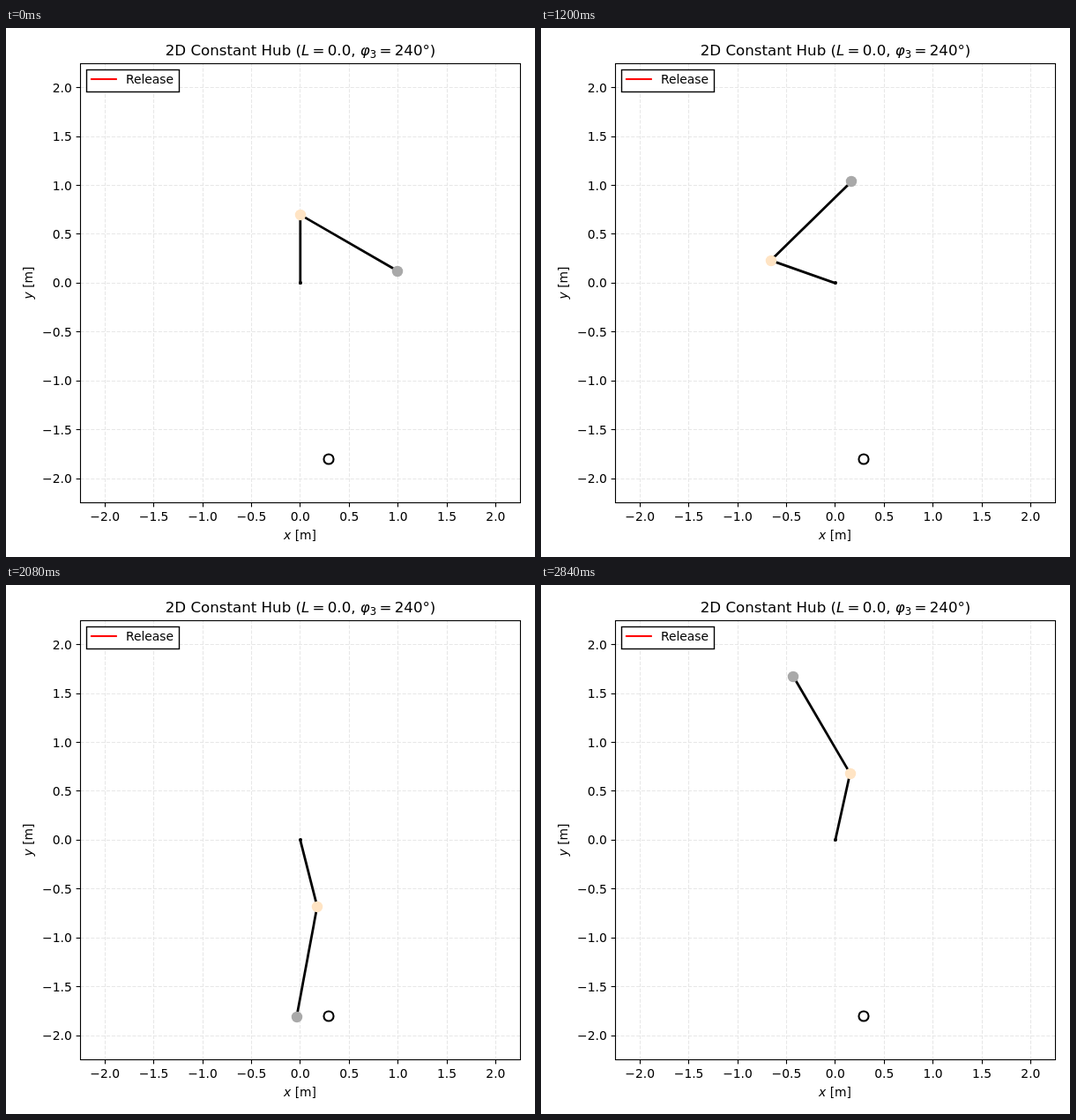
An HTML page with a canvas that plays this animation: 600 by 600 pixels, repeating every 2860 ms.

```html
<!DOCTYPE html>
<html lang="en">
<head>
<meta charset="utf-8">
<title>2D Constant Hub</title>
<style>
html, body { margin: 0; width: 100%; height: 100%; overflow: hidden; background: #fff; }
canvas { display: block; width: 600px; height: 600px; }
</style>
</head>
<body>
<canvas id="stage" width="600" height="600"></canvas>
<script>
const ctx = document.getElementById('stage').getContext('2d');
const LOOP = 2860, STEP = 20;
const X0 = 333.8, Y0 = 289.4, UNIT = 110.8;
const BOX = { l: 84.5, t: 40.5, r: 583.5, b: 538.5 };
const PT = 100 / 72;
const FAMILY = '"DejaVu Sans", sans-serif';
const ARM = 0.7, CLUB = 1.15;
const RATE = 49.25; // degrees per second squared under constant torque

// After release: [seconds, arm lag in degrees, wrist opening in degrees]
const RELEASE = [
  [0.88, 0, 0], [1.08, 0.1, 1], [1.3, 0.8, 7.8], [1.5, 2.4, 21.2],
  [1.62, 4.25, 31.4], [2.08, 18.8, 95.2], [2.16, 22.3, 107.7],
  [2.44, 37.1, 150.2], [2.7, 47.4, 169], [2.84, 49.7, 162.8]
];

const px = x => X0 + x * UNIT;
const py = y => Y0 - y * UNIT;
const snap = v => Math.floor(v) + 0.5;

function chord(i, k) {
  const a = RELEASE[i], b = RELEASE[i + 1];
  return (b[k] - a[k]) / (b[0] - a[0]);
}

function slope(i, k) {
  const last = RELEASE.length - 1;
  if (i === 0) return 0;
  if (i === last) return 2 * chord(last - 1, k) - slope(last - 1, k);
  const h0 = RELEASE[i][0] - RELEASE[i - 1][0];
  const h1 = RELEASE[i + 1][0] - RELEASE[i][0];
  return (chord(i - 1, k) * h1 + chord(i, k) * h0) / (h0 + h1);
}

function curve(t, k) {
  if (t <= RELEASE[0][0]) return 0;
  let i = 0;
  while (i < RELEASE.length - 2 && t > RELEASE[i + 1][0]) i++;
  const a = RELEASE[i], b = RELEASE[i + 1], h = b[0] - a[0];
  const u = (t - a[0]) / h, v = 1 - u;
  return v * v * (1 + 2 * u) * a[k] + u * u * (1 + 2 * v) * b[k]
    + h * u * v * (v * slope(i, k) - u * slope(i + 1, k));
}

function line(x1, y1, x2, y2, color, width, cap = 'butt') {
  ctx.strokeStyle = color;
  ctx.lineWidth = width;
  ctx.lineCap = cap;
  ctx.beginPath();
  ctx.moveTo(x1, y1);
  ctx.lineTo(x2, y2);
  ctx.stroke();
}

function disc(x, y, r, color) {
  ctx.fillStyle = color;
  ctx.beginPath();
  ctx.arc(Math.round(x), Math.round(y), r, 0, 2 * Math.PI);
  ctx.fill();
}

function text(str, x, y, align = 'left', size = 10 * PT, style = '') {
  ctx.font = `${style} ${size}px ${FAMILY}`;
  ctx.textAlign = align;
  ctx.fillStyle = '#000';
  ctx.fillText(str, x, y);
  return ctx.measureText(str).width;
}

// Runs are [string, style, gap around, scale, drop], centred on cx
function mixed(runs, cx, y, size) {
  const width = ([s, style, gap = 0, scale = 1]) => {
    ctx.font = `${style} ${size * scale}px ${FAMILY}`;
    return ctx.measureText(s).width + 2 * gap;
  };
  let x = cx - runs.reduce((sum, run) => sum + width(run), 0) / 2;
  for (const run of runs) {
    const [s, style, gap = 0, scale = 1, drop = 0] = run;
    text(s, x + gap, y + drop, 'left', size * scale, style);
    x += width(run);
  }
}

function drawAxes() {
  const thin = 0.8 * PT, tick = 3.5 * PT;
  const marks = Array.from({ length: 9 }, (_, i) => i / 2 - 2);
  const label = v => v.toFixed(1).replace('-', '\u2212');

  ctx.setLineDash([2.96 * PT, 1.28 * PT]);
  for (const v of marks) {
    const x = snap(px(v)), y = snap(py(v));
    line(x, BOX.b, x, BOX.t, '#e7e7e7', thin);
    line(BOX.l, y, BOX.r, y, '#e7e7e7', thin);
  }
  ctx.setLineDash([]);

  for (const v of marks) {
    const x = snap(px(v)), y = snap(py(v));
    line(x, BOX.b, x, BOX.b + tick, '#000', thin);
    line(BOX.l, y, BOX.l - tick, y, '#000', thin);
    text(label(v), px(v), 559, 'center');
    text(label(v), 74.8, Math.round(py(v) + 5), 'right');
  }

  const unit = name => [[name, 'italic'], [' [m]', '']];
  mixed(unit('x'), 333.5, 580, 10 * PT);
  ctx.save();
  ctx.translate(29.5, 289);
  ctx.rotate(-Math.PI / 2);
  mixed(unit('y'), 0, 0, 10 * PT);
  ctx.restore();

  const equals = ['=', '', 3.25];
  mixed([
    ['2D Constant Hub (', ''], ['L', 'italic'], equals, ['0.0, ', ''],
    ['\u03c6', 'italic'], ['3', '', 0, 0.7, 2.7], equals, ['240\u00b0)', '']
  ], 334, 31, 12 * PT);
}

function drawFrame() {
  ctx.strokeStyle = '#000';
  ctx.lineWidth = 0.8 * PT;
  ctx.strokeRect(BOX.l, BOX.t, BOX.r - BOX.l, BOX.b - BOX.t);

  ctx.fillStyle = '#fff';
  ctx.lineWidth = PT;
  ctx.fillRect(91.5, 47.5, 105, 25);
  ctx.strokeRect(91.5, 47.5, 105, 25);
  line(97, 58, 124.8, 58, '#f00', 1.5 * PT, 'square');
  text('Release', 135.9, 63);
}

function drawSwing(t) {
  const rad = Math.PI / 180;
  const arm = 90 + RATE * t * t - curve(t, 1);
  const club = arm + 240 + curve(t, 2);
  const hx = ARM * Math.cos(arm * rad), hy = ARM * Math.sin(arm * rad);
  const ex = hx + CLUB * Math.cos(club * rad), ey = hy + CLUB * Math.sin(club * rad);

  ctx.strokeStyle = '#000';
  ctx.lineWidth = 1.5 * PT;
  ctx.beginPath();
  ctx.arc(366, 489, 4 * PT, 0, 2 * Math.PI);
  ctx.stroke();

  line(X0, Y0, px(hx), py(hy), '#000', 2 * PT, 'square');
  line(px(hx), py(hy), px(ex), py(ey), '#000', 2 * PT, 'square');
  disc(X0, Y0, 2, '#000');
  disc(px(hx), py(hy), 4.5 * PT, '#ffe4c4');
  disc(px(ex), py(ey), 4.5 * PT, '#a9a9a9');
}

function render(now) {
  const ms = Math.floor((now % LOOP) / STEP) * STEP;
  ctx.fillStyle = '#fff';
  ctx.fillRect(0, 0, 600, 600);
  drawAxes();
  drawSwing(ms / 1000);
  drawFrame();
}

let start = null;
function loop(now) {
  if (start === null) start = now;
  render(now - start);
  requestAnimationFrame(loop);
}
render(0);
requestAnimationFrame(loop);
</script>
</body>
</html>
```
